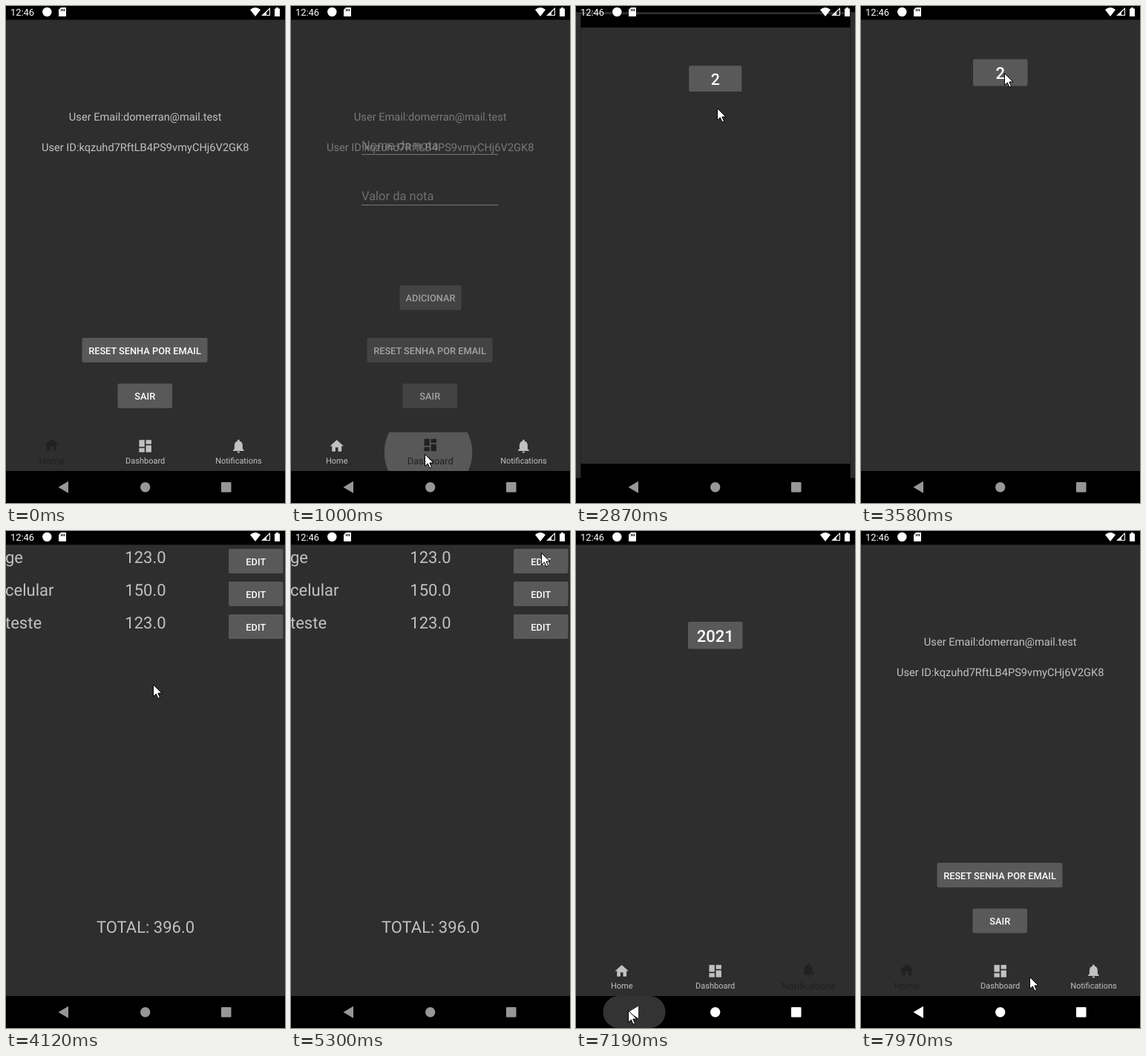
Animation, 376 px wide and 668 px high, one loop 8000 ms. Source, as an HTML page with a canvas:

```html
<!DOCTYPE html>
<html lang="pt">
<head>
<meta charset="utf-8">
<title>Notas</title>
<style>
html, body { margin: 0; height: 100%; overflow: hidden; background: #000; }
canvas { display: block; }
</style>
</head>
<body>
<canvas id="stage" width="376" height="668"></canvas>
<script>
const W = 376, H = 668, TOP = 18.5, BOTTOM = 625, LOOP = 8000;
const BG = '#2e2e2e', TEXT = '#c1c1c1', BUTTON = '#595959', ACTIVE = '#212121';
const c = document.getElementById('stage').getContext('2d');
c.textRendering = 'geometricPrecision';

const clamp = x => Math.max(0, Math.min(1, x));
const ramp = (t, start, length) => clamp((t - start) / length);
const easeOut = p => 1 - (1 - p) ** 2;
const smooth = p => p * p * (3 - 2 * p);

function rect(x, y, w, h, color, r = 0) {
  c.fillStyle = color;
  c.beginPath();
  c.roundRect(x, y, w, h, r);
  c.fill();
}

function disc(x, y, r, color) {
  c.fillStyle = color;
  c.beginPath();
  c.arc(x, y, r, 0, 7);
  c.fill();
}

// y is the middle of the capital letters
function text(s, x, y, size, color = TEXT, align = 'center', weight = 400) {
  c.font = `${weight} ${size}px Roboto, sans-serif`;
  c.textAlign = align;
  c.fillStyle = color;
  c.fillText(s, x, y + size * 0.355);
}

function shape(path, x, y, scale, color) {
  c.save();
  c.translate(x, y);
  c.scale(scale, scale);
  c.fillStyle = color;
  c.fill(path, 'evenodd');
  c.restore();
}

function button(label, x, y, w, h, size = 12.8) {
  rect(x, y, w, h, BUTTON, 2);
  text(label, x + w / 2, y + h / 2 + 0.5, size, '#fff', 'center', 500);
}

function faded(alpha, draw) {
  if (alpha <= 0) return;
  c.save();
  c.globalAlpha *= alpha;
  draw();
  c.restore();
}

const tabs = [
  ['Home', 61.7, 'M10 20v-6h4v6h5v-8h3L12 3 2 12h3v8z'],
  ['Dashboard', 187.7, 'M3 13h8V3H3zm0 8h8v-6H3zm10 0h8V11h-8zm0-18v6h8V3z'],
  ['Notifications', 313.4, 'M12 22c1.1 0 2-.9 2-2h-4c0 1.1.9 2 2 2zm6-6v-5c0-3.07-1.63-5.64-4.5-6.32V4c0-.83-.67-1.5-1.5-1.5s-1.5.67-1.5 1.5v.68C7.64 5.36 6 7.92 6 11v5l-2 2v1h16v-1l-2-2z']
].map(([name, x, d]) => ({ name, x, icon: new Path2D(d) }));

const pages = [
  () => {
    text('User Email:domerran@mail.test', 187.7, 149, 14.64);
    text('User ID:kqzuhd7RftLB4PS9vmyCHj6V2GK8', 187.7, 189.5, 14.64);
    button('RESET SENHA POR EMAIL', 102.5, 446, 169, 33);
    button('SAIR', 150.5, 507.5, 73.5, 33);
  },
  () => {
    [['Nome da nota', 187], ['Valor da nota', 255]].forEach(([hint, y]) => {
      text(hint, 95, y, 16.5, '#b4b4b4', 'left');
      rect(95, y + 12, 184, 1, '#c1c1c1');
    });
    button('ADICIONAR', 146.5, 375.5, 83, 33);
  },
  () => button('2021', 151, 122, 73.5, 36.5, 22)
];

const tabChanges = [
  { tab: 1, press: 860, fade: 900, x: 185 },
  { tab: 2, press: 2290, fade: 2385, x: 315 }
];

function tabRipple({ tab, press, x }, t) {
  if (t < press) return;
  c.save();
  c.beginPath();
  c.rect(tab * 125.5, 573, 125.5, BOTTOM - 573);
  c.clip();
  c.globalAlpha *= 0.2 * (1 - ramp(t, press + 230, 220));
  disc(x, 600, 82 * easeOut(ramp(t, press, 300)), '#fff');
  c.restore();
}

function mainScreen(t) {
  const [toDash, toNotes] = tabChanges.map(ch => ramp(t, ch.fade, 210));
  const back = ramp(t, 7230, 210);
  faded(1 - toDash + back, pages[0]);
  faded(toDash - toNotes, pages[1]);
  faded(toNotes - back, pages[2]);
  tabChanges.forEach(ch => tabRipple(ch, t));
  const active = back ? 0 : toNotes ? 2 : toDash ? 1 : 0;
  tabs.forEach(({ name, x, icon }, i) => {
    const on = i === active, color = on ? ACTIVE : TEXT;
    shape(icon, x - 11, on ? 579 : 580.5, 0.915, color);
    text(name, x, 611.5, on ? 12.8 : 11, color);
  });
}

function monthScreen() {
  button('2', 151, 71.5, 73.5, 36, 22);
}

function listScreen() {
  [['ge', '123.0'], ['celular', '150.0'], ['teste', '123.0']].forEach(([name, value], i) => {
    const y = 35 + 44 * i;
    text(name, -1, y, 22, TEXT, 'left');
    text(value, 188, y, 22);
    button('EDIT', 300, y - 11, 73.5, 33);
  });
  text('TOTAL: 396.0', 188, 532, 22);
}

const screens = [mainScreen, monthScreen, listScreen];

function openWindow(i, t, scale = 1, alpha = 1) {
  faded(alpha, () => {
    c.translate(W / 2, H / 2);
    c.scale(scale, scale);
    c.translate(-W / 2, -H / 2);
    rect(0, 0, W, H, '#000');
    rect(0, TOP, W, BOTTOM - TOP, BG);
    screens[i](t);
  });
}

const moves = [
  { at: 2668, from: 0, to: 1 },
  { at: 3640, from: 1, to: 2 },
  { at: 6080, from: 2, to: 1 },
  { at: 6660, from: 1, to: 0 }
];

function windows(t) {
  const move = moves.findLast(m => t >= m.at);
  if (!move) return openWindow(0, t);
  const { at, from, to } = move;
  const p = ramp(t, at, 400), e = easeOut(p);
  if (p === 1) return openWindow(to, t);
  if (to > from) {
    openWindow(from, t, 1 + 0.042 * e);
    openWindow(to, t, 0.85 + 0.15 * e, ramp(t, at + 35, 60));
  } else {
    openWindow(to, t, 1.1 - 0.1 * e);
    openWindow(from, t, 1 - 0.1 * e, 1 - ramp(t, at + 30, 90));
  }
}

const card = new Path2D('M3 0h7v12H0V3zM3 2v3h1V2zm2 0v3h1V2zm2 0v3h1V2z');
const wifi = new Path2D('M0 3Q7-3 14 3L7 12z');
const signal = new Path2D('M0 11L12 0V11zM7 6.5V10H11V2.5z');
const battery = new Path2D('M2 0h3v1.5h2V12H0V1.5h2z');
const arrow = new Path2D('M0 0V16L3.8 12.5 6.5 18.5 9 17.3 6.4 11.5H11.5Z');
const triangle = new Path2D('M0 8L13.5 0V16Z');

function systemBars(t) {
  text('12:46', 6, 8.3, 12.8, '#fff', 'left');
  disc(55.3, 8, 6.2, '#fff');
  shape(card, 71, 2, 1, '#fff');
  shape(wifi, 329, 2, 1, '#fff');
  shape(signal, 344, 2, 1, '#fff');
  shape(battery, 362, 2, 1, '#fff');

  [6000, 6580, 7065].forEach(press => {
    if (t < press) return;
    const w = 40 + 57 * easeOut(ramp(t, press, 220));
    faded(0.2 * (1 - ramp(t, press + 170, 150)), () =>
      rect(78.5 - w / 2, BOTTOM, w, H - BOTTOM, '#fff', 21));
  });
  const color = t < 5860 ? '#979797' : '#fff';
  shape(triangle, 70.5, 638.7, 1, color);
  disc(187.7, 646.7, 6.7, color);
  rect(290, 640, 13.5, 13.5, color, 1);
}

// time, x, y
const path = [
  [220, 34, 634], [800, 181, 603], [1630, 181, 603], [2250, 313, 601],
  [2370, 313, 601], [2610, 184, 142], [2740, 184, 142], [2870, 191, 138],
  [3150, 193, 130], [3450, 194, 91], [3720, 194, 91], [4110, 199, 207],
  [4200, 199, 207], [4500, 215, 555], [4700, 130, 565], [4990, 6, 29],
  [5300, 338, 30], [5450, 338, 125], [5850, 71, 643], [6600, 71, 643],
  [7100, 71, 645], [7480, 71, 645], [7580, 91, 649], [7780, 240, 430],
  [7950, 228, 600], [LOOP, 228, 600]
];

function cursor(t) {
  const i = path.findIndex(k => k[0] > t);
  if (i < 1) return;
  const [t0, x0, y0] = path[i - 1], [t1, x1, y1] = path[i];
  const p = smooth((t - t0) / (t1 - t0));
  c.save();
  c.translate(Math.round(x0 + (x1 - x0) * p) - 0.5, Math.round(y0 + (y1 - y0) * p) - 0.5);
  c.fillStyle = '#fff';
  c.strokeStyle = '#000';
  c.lineWidth = 1;
  c.fill(arrow);
  c.stroke(arrow);
  c.restore();
}

const STEP = 78.2, REST = 220;
function recorded(t) {
  return t < REST ? 0 : REST + STEP * Math.floor((t - REST + 14) / STEP);
}

function frame(now) {
  const t = recorded(now % LOOP);
  rect(0, 0, W, H, '#000');
  windows(t);
  systemBars(t);
  cursor(t);
  requestAnimationFrame(frame);
}
requestAnimationFrame(frame);
</script>
</body>
</html>
```
